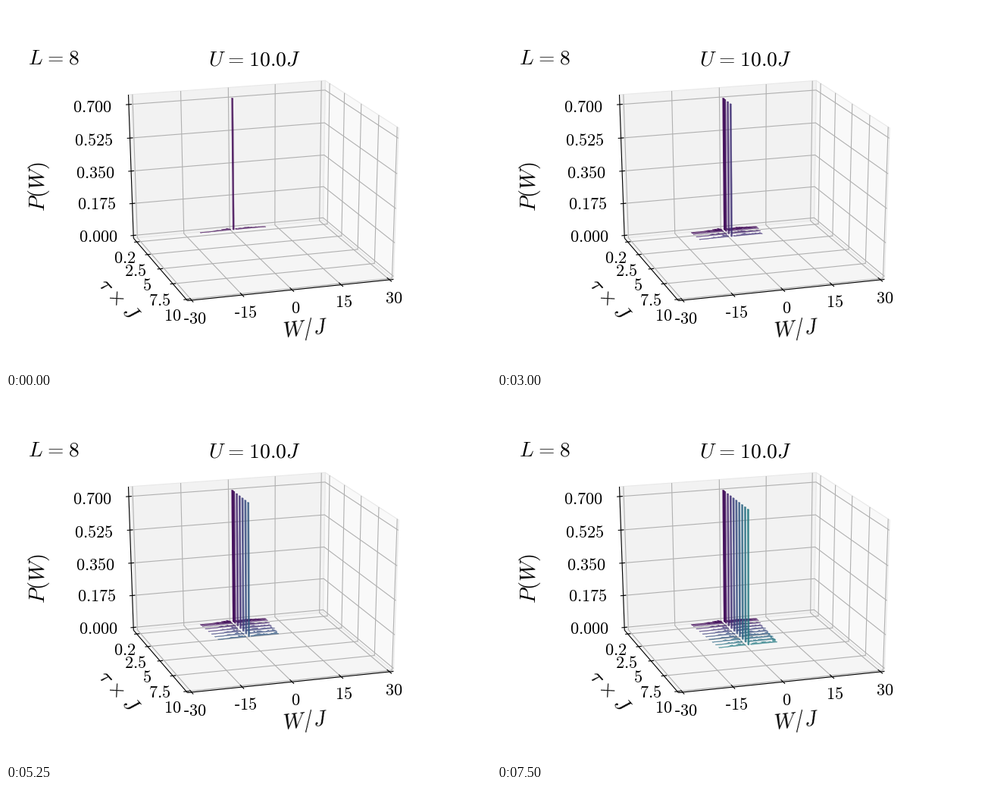
A matplotlib script that plays this animation: 640x480 px, repeating every 8 s.

```python
import numpy as np
import matplotlib.pyplot as plt
from matplotlib.animation import FuncAnimation
from matplotlib.collections import LineCollection, PolyCollection

plt.rcParams["mathtext.fontset"] = "cm"

WIDTH, HEIGHT, DPI = 640, 480, 100
FRAMES, INTERVAL, HOLD = 32, 250, 3

# Pane extents along work W, duration tau and probability P
W0, W1 = -31.25, 31.25
T0, T1 = -0.5, 10.2
P0, P1 = -0.0153, 0.7503

W_TICKS = [-30, -15, 0, 15, 30]
T_TICKS = [0.2, 2.5, 5, 7.5, 10]
P_TICKS = [0, 0.175, 0.35, 0.525, 0.7]

# Camera calibration: (W, tau, P) -> (x, y) on the stage
ANCHORS = [
    ((W0, T0, P0), (168, 306.5)),
    ((W0, T0, P1), (161.5, 117)),
    ((W1, T0, P1), (421.5, 98)),
    ((W1, T0, P0), (417.7, 282.4)),
    ((W1, T1, P1), (518, 160.5)),
    ((W1, T1, P0), (511.5, 361)),
    ((W0, T1, P0), (239, 388)),
    ((0, T0, P0), (296, 294.5)),
    ((0, T1, P0), (378, 374.3)),
    ((W0, T0, 0.7), (161.9, 130)),
    ((W1, T0, 0.7), (421.2, 111)),
    ((W1, T1, 0.7), (517.6, 174.8)),
]


def unit(p):
    return np.asarray(p, float) / (30, 10, 0.7)


def fit_camera(anchors):
    rows, rhs = [], []
    for point, (x, y) in anchors:
        q = np.append(unit(point), 1)
        x, y = x / 100, y / 100
        rows.append(np.concatenate([q, np.zeros(4), -x * q[:3]]))
        rows.append(np.concatenate([np.zeros(4), q, -y * q[:3]]))
        rhs += [x, y]
    sol = np.linalg.lstsq(np.array(rows), np.array(rhs), rcond=None)[0]
    return np.append(sol, 1).reshape(3, 4)


CAMERA = fit_camera(ANCHORS)


def project(points):
    q = unit(points)
    q = np.concatenate([q, np.ones(q.shape[:-1] + (1,))], axis=-1) @ CAMERA.T
    return 100 * q[..., :2] / q[..., 2:]


fig = plt.figure(figsize=(WIDTH / DPI, HEIGHT / DPI), dpi=DPI, facecolor="white")
ax = fig.add_axes([0, 0, 1, 1])
ax.set_xlim(0, WIDTH)
ax.set_ylim(HEIGHT, 0)
ax.axis("off")


def draw_panes():
    back = [(W0, T0, P0), (W1, T0, P0), (W1, T0, P1), (W0, T0, P1)]
    side = [(W1, T0, P0), (W1, T1, P0), (W1, T1, P1), (W1, T0, P1)]
    floor = [(W0, T0, P0), (W1, T0, P0), (W1, T1, P0), (W0, T1, P0)]
    panes = PolyCollection(project([side, back, floor]),
                           facecolors=["#f9f9f9", "#f2f2f2", "#f5f5f5"],
                           edgecolors="#e8e8e8", linewidths=0.8, zorder=1)
    ax.add_collection(panes)


def draw_lines(lines, color, zorder):
    paths = [project(line) for line in lines]
    ax.add_collection(LineCollection(paths, colors=color, linewidths=0.8,
                                     zorder=zorder))


def draw_frame():
    grid = [[(w, T0, P1), (w, T0, P0), (w, T1, P0)] for w in W_TICKS]
    grid += [[(W1, t, P1), (W1, t, P0), (W0, t, P0)] for t in T_TICKS]
    grid += [[(W0, T0, p), (W1, T0, p), (W1, T1, p)] for p in P_TICKS]
    draw_lines(grid, "#b0b0b0", 2)

    axes = [[(W0, T0, P1), (W0, T0, P0)],
            [(W0, T0, P0), (W0, T1, P0)],
            [(W0, T1, P0), (W1, T1, P0)]]
    ticks = [[(w, T1 - 0.35, P0), (w, T1 + 0.3, P0)] for w in W_TICKS]
    ticks += [[(W0 - 0.8, t, P0), (W0 + 0.9, t, P0)] for t in T_TICKS]
    ticks += [[(W0 - 0.9, T0, p), (W0 + 0.9, T0, p)] for p in P_TICKS]
    draw_lines(axes + ticks, "black", 3)


def label(x, y, text, size=16, **kw):
    kw = {"ha": "center", "va": "baseline", **kw}
    ax.text(x, y, text, fontsize=size, color="black", zorder=6, **kw)


def spaced(left, op, right):
    gap = r"\hspace{0.08}"
    return f"${left}{gap}{op}{gap}{right}$"


def draw_labels():
    for i, p in enumerate(P_TICKS):
        y = (311, 268.5, 227, 184, 140)[i]
        label(122 - 2 * i, y, f"${p:.3f}$")
    for t, x, y in zip(T_TICKS, (157, 171, 186, 203, 220),
                       (339, 356, 375, 395, 415)):
        label(x, y, f"${t:g}$")
    for w, x, y in zip(W_TICKS, (249, 315.5, 382.5, 446, 512),
                       (419, 411, 405, 397, 392)):
        sign = "-" if w < 0 else ""
        label(x, y, f"{sign}${abs(w)}$")

    label(29, 76.5, spaced("L", "=", "8"), 19.8, ha="left")
    label(328, 78.5, spaced("U", "=", "10.0J"), 19.8)
    middle = dict(va="center", rotation_mode="anchor")
    label(44, 238, r"$P(W)$", 20.3, rotation=90, **middle)
    label(395, 426.5, r"$W/J$", 20.2, rotation=5.7, **middle)
    label(149, 387, spaced(r"\tau", r"\times", "J"), 20,
          rotation=-48, **middle)


TAUS = np.concatenate([[0.2, 0.3], np.arange(0.5, 4.6, 0.5)])
BAR_W, BAR_T = 0.36, 0.1
PEAK = 0.707


def bump(w, center, width):
    return np.exp(-((w - center) / width) ** 2)


def spectrum(tau, rng):
    """Work values and their probabilities for one quench duration."""
    reach = 10.7 - 0.35 * tau
    w = np.arange(-reach, reach + 0.1, 0.5)
    w = w[np.abs(w) > 0.8]
    p = (0.013 * bump(w, -2.5, 1.3) + 0.006 * bump(w, -5.3, 0.8)
         + 0.010 * bump(w, 3.5, 2.6) + 0.005 * bump(w, 7.5, 1.2))
    p *= rng.uniform(0.25, 1.1, len(w))
    p += 0.004 * tau * bump(w, reach - 1, 0.4)
    return np.append(w, 0), np.append(p, PEAK)


def bar_faces(w, tau, p):
    a, b = w + 0.2 - BAR_W / 2, w + 0.2 + BAR_W / 2
    c, d = tau - 0.1 - BAR_T / 2, tau - 0.1 + BAR_T / 2
    top = [(a, c, p), (b, c, p), (b, d, p), (a, d, p)]
    left = [(a, c, 0), (a, d, 0), (a, d, p), (a, c, p)]
    front = [(a, d, 0), (b, d, 0), (b, d, p), (a, d, p)]
    return [top, left, front]


SHADES = (0.95, 1.0, 0.88)


def build_rows():
    rng = np.random.default_rng(8)
    rows = []
    for tau in TAUS:
        base = np.array(plt.cm.viridis(tau / 10)[:3])
        faces, colors = [], []
        w, p = spectrum(tau, rng)
        for i in np.argsort(-w):
            faces += bar_faces(w[i], tau, p[i])
            alpha = 0.85 if p[i] == PEAK else 0.6
            colors += [(*(base * s), alpha) for s in SHADES]
        rows.append((project(faces), np.array(colors)))
    return rows


draw_panes()
draw_frame()
draw_labels()
ROWS = build_rows()
bars = PolyCollection([], linewidths=0.2, zorder=5)
ax.add_collection(bars)


def update(i):
    shown = ROWS[:i // HOLD + 1]
    colors = np.concatenate([c for _, c in shown])
    bars.set_verts(np.concatenate([f for f, _ in shown]))
    bars.set_facecolor(colors)
    bars.set_edgecolor(colors)
    return [bars]


anim = FuncAnimation(fig, update, frames=FRAMES, interval=INTERVAL,
                     init_func=lambda: update(0), repeat=True,
                     repeat_delay=0, blit=False)
plt.show()
```
